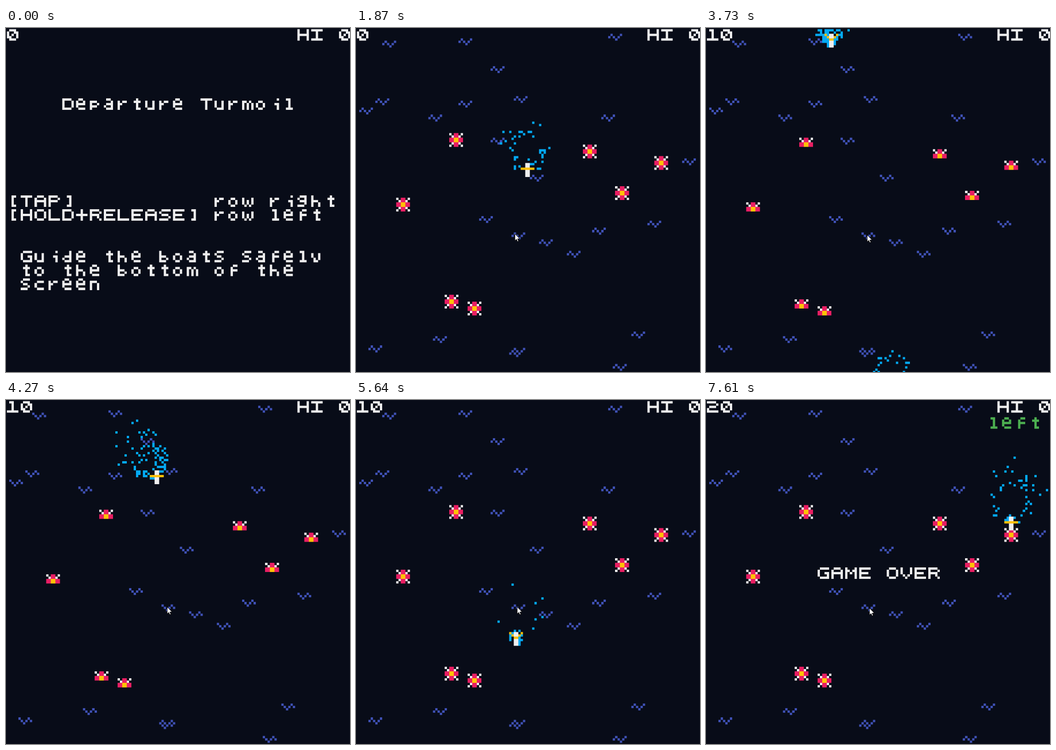
An HTML page with a canvas that plays this animation: 749 px wide and 748 px high, repeating every 8.04 s.

```html
<!DOCTYPE html>
<html lang="en">
<head>
<meta charset="utf-8">
<title>Departure Turmoil</title>
<style>
html, body { margin: 0; width: 100%; height: 100%; overflow: hidden; background: #080c18; }
canvas { display: block; }
</style>
</head>
<body>
<canvas id="stage" width="749" height="748" aria-label="Departure Turmoil, a pixel rowing game"></canvas>
<script>
const W = 749, H = 748, CELLS = 150, CELL = 5.02;
const LOOP = 8040, START = 120, OVER = 7605, BEAT = 410, TICK = 1000 / 60;
const WHITE = '#eeeeee', RED = '#e91e63', YELLOW = '#ffc107', BLUE = '#03a9f4',
      WAVE = '#3f51b5', GREEN = '#4caf50', SEA = '#080c18';

// The game is drawn one pixel per cell, enlarged crisply at double size, then halved.
function layer(width, height) {
  return Object.assign(document.createElement('canvas'), { width, height }).getContext('2d');
}
const stage = document.getElementById('stage').getContext('2d');
const grid = layer(CELLS, CELLS), big = layer(W * 2, H * 2);
big.imageSmoothingEnabled = false;

// Letters as strokes: each word is a polyline of xy digit pairs on a 5x5 grid.
const GLYPHS = {
  0: '1030 4143 3414 0301 3113', 1: '102024 0444', 2: '0030 41 1232 03 0444',
  A: '1030 0104 4144 0242', D: '04003041433404', E: '40000444 0232',
  G: '4010 0103 1444 4342 32', H: '0004 4044 0242', I: '0040 2024 0444',
  L: '000444', M: '0400 4044 112231', O: '1030 4143 3414 0301',
  P: '040030 41 3202', R: '040030 41 3202 3344', S: '4010 01 1232 43 3404',
  T: '0040 2024', V: '0002 4042 13 33 24',
  '[': '30202434', ']': '20303424', '+': '2024 0242',
  a: '1020 3134 1222 03 1424', b: '0004 1222 33 1424', c: '3111 0203 1434',
  d: '3034 1222 03 1424', e: '1020 31 3202 0103 1434', f: '3020 1114 1232',
  g: '3010 01 1232 3033 2404', h: '0004 1222 3334', i: '30 223234',
  l: '102024 1434', m: '0104 11 2224 31 4244', n: '0104 1121 3234',
  o: '1121323324140302', p: '0104 1121 32 2313', r: '0104 12 2131',
  s: '3010 01 1222 33 2404', t: '202434 1131', u: '0103 3134 1424',
  w: '0103 4143 2223 14 34', y: '0102 3133 13 2414'
};

const WAVES = [[1,34],[8,30],[11,5],[44,4],[44,31],[31,37],[58,16],[68,29],[58,47],
  [109,2],[106,37],[141,56],[75,63],[53,81],[67,88],[79,91],[91,96],[102,86],
  [126,83],[119,131],[111,145],[33,133],[5,137],[66,139],[67,138]];
const MINES = [[40,45],[98,50],[129,55],[112,68],[17,73],[38,115],[48,118]];

// Each boat enters at the top; keys give its sideways course as [time, x].
const BOATS = [
  { from: 678, to: 3627, keys: [[678,71],[2100,71],[2700,76],[3200,76],[3600,77]] },
  { from: 3627, to: 6573, keys: [[3627,51],[3800,51],[4500,66]] },
  { from: 6573, to: LOOP, keys: [[6573,139],[7200,131.4],[7490,129]] }
];

const mod = (a, n) => (a % n + n) % n;
const rnd = n => mod(Math.sin(n * 127.1 + 3.7) * 43758.5453, 1);

function box(x, y, w, h, color) {
  grid.fillStyle = color;
  grid.fillRect(Math.round(x), Math.round(y), w, h);
}

function strokes(path, x, y, color) {
  for (const line of path.split(' ')) {
    const pts = line.match(/../g).map(p => [+p[0], +p[1]]);
    pts.forEach(([x1, y1], i) => {
      const [x0, y0] = pts[Math.max(0, i - 1)];
      const n = Math.max(Math.abs(x1 - x0), Math.abs(y1 - y0), 1);
      for (let k = 0; k <= n; k++)
        box(x + x0 + (x1 - x0) * k / n, y + y0 + (y1 - y0) * k / n, 1, 1, color);
    });
  }
}

function text(str, x, y, color = WHITE) {
  [...str].forEach((c, i) => GLYPHS[c] && strokes(GLYPHS[c], x + i * 6, y, color));
}

function mine(x, y, half) {
  const top = half ? y + 2 : y, rows = half ? 4 : 6;
  box(x + 2, top, 2, rows, RED);
  box(x, top + 2, 6, 2, RED);
  box(x + 2, top + 2, 2, 2, YELLOW);
  strokes('0011 5041' + (half ? '' : ' 0514 5544'), x, top, WHITE);
}

function boatAt(t) {
  const b = BOATS.find(b => t >= b.from && t < b.to);
  if (!b) return null;
  let x = b.keys[0][1];
  b.keys.slice(1).forEach(([time, next], i) => {
    const [t0, x0] = b.keys[i];
    const u = Math.min(1, Math.max(0, (t - t0) / (time - t0)));
    if (u > 0) x = x0 + (next - x0) * u * u * (3 - 2 * u);
  });
  return { x, y: -3 + (t - b.from) * 0.0512 };
}

const pulling = t => mod(t - 290, BEAT) < BEAT / 2;

function boat(t) {
  const b = boatAt(t);
  if (!b) return;
  const x = Math.round(b.x), y = Math.round(b.y);
  box(x + 2, y, 2, 6, WHITE);
  strokes(pulling(t) ? '0022 5032' : '0252', x, y, YELLOW);
}

// Spray thrown off on every tick of a pull, spreading until it dies.
function spray(t) {
  const last = Math.floor(t / TICK);
  for (let k = last - 18; k <= last; k++) {
    const born = k * TICK, age = t - born, b = boatAt(born);
    if (!b || !pulling(born)) continue;
    for (let i = 0; i < 19; i++) {
      const seed = k * 19 + i;
      if (age > rnd(seed) * 300) continue;
      const a = rnd(seed + 0.31) * Math.PI * 2;
      const r = 1 + 2 * rnd(seed + 0.57) + age * (0.024 + 0.022 * rnd(seed + 0.83));
      box(b.x + 2.5 + Math.cos(a) * r, b.y + 2 + Math.sin(a) * r, 1, 1, BLUE);
    }
  }
}

function cursor(t) {
  const step = t < 2300 ? 0 : t < 7490 ? 1 : 2;
  stage.save();
  stage.translate(346 + step * 5, 447.5 + step * 2.5);
  const arrow = new Path2D('M0 0V15L3.4 11.8 5.7 17 8 16 5.8 10.9H10.6Z');
  stage.fillStyle = '#fff';
  stage.strokeStyle = '#000';
  stage.fill(arrow);
  stage.stroke(arrow);
  stage.restore();
}

function titleScreen() {
  text('Departure Turmoil', 24, 30);
  text('[TAP]          row right', 0, 72);
  text('[HOLD+RELEASE] row left', 0, 78);
  text('Guide the boats safely', 6, 96);
  text('to the bottom of the', 6, 102);
  text('screen', 6, 108);
}

function game(t) {
  const now = Math.min(t, 7610), half = now % BEAT < BEAT / 2;
  for (const [x, y] of WAVES) strokes(half ? '00224051' : '01103250', x, y, WAVE);
  spray(now);
  for (const [x, y] of MINES) mine(x, y, half);
  boat(now);
  if (now >= 7200) text('left', 122, Math.round(5.7 + 20 * 0.9 ** ((now - 7200) / TICK)), GREEN);
  if (t >= OVER) text('GAME OVER', 48, 72);
}

function show() {
  const size = CELLS * CELL * 2;
  big.fillStyle = SEA;
  big.fillRect(0, 0, W * 2, H * 2);
  big.drawImage(grid.canvas, 4, 5, size, size);
  stage.drawImage(big.canvas, 0, 0, W, H);
}

function frame(ms) {
  const t = ms % LOOP;
  box(0, 0, CELLS, CELLS, SEA);
  if (t < START) titleScreen();
  else game(t);
  text(t < BOATS[1].from ? '0' : t < BOATS[2].from ? '10' : '20', 0, 0);
  text('HI 0', 126, 0);
  show();
  if (t >= START) cursor(t);
}

const begin = performance.now();
function play() {
  frame(performance.now() - begin);
  requestAnimationFrame(play);
}
play();
</script>
</body>
</html>
```
